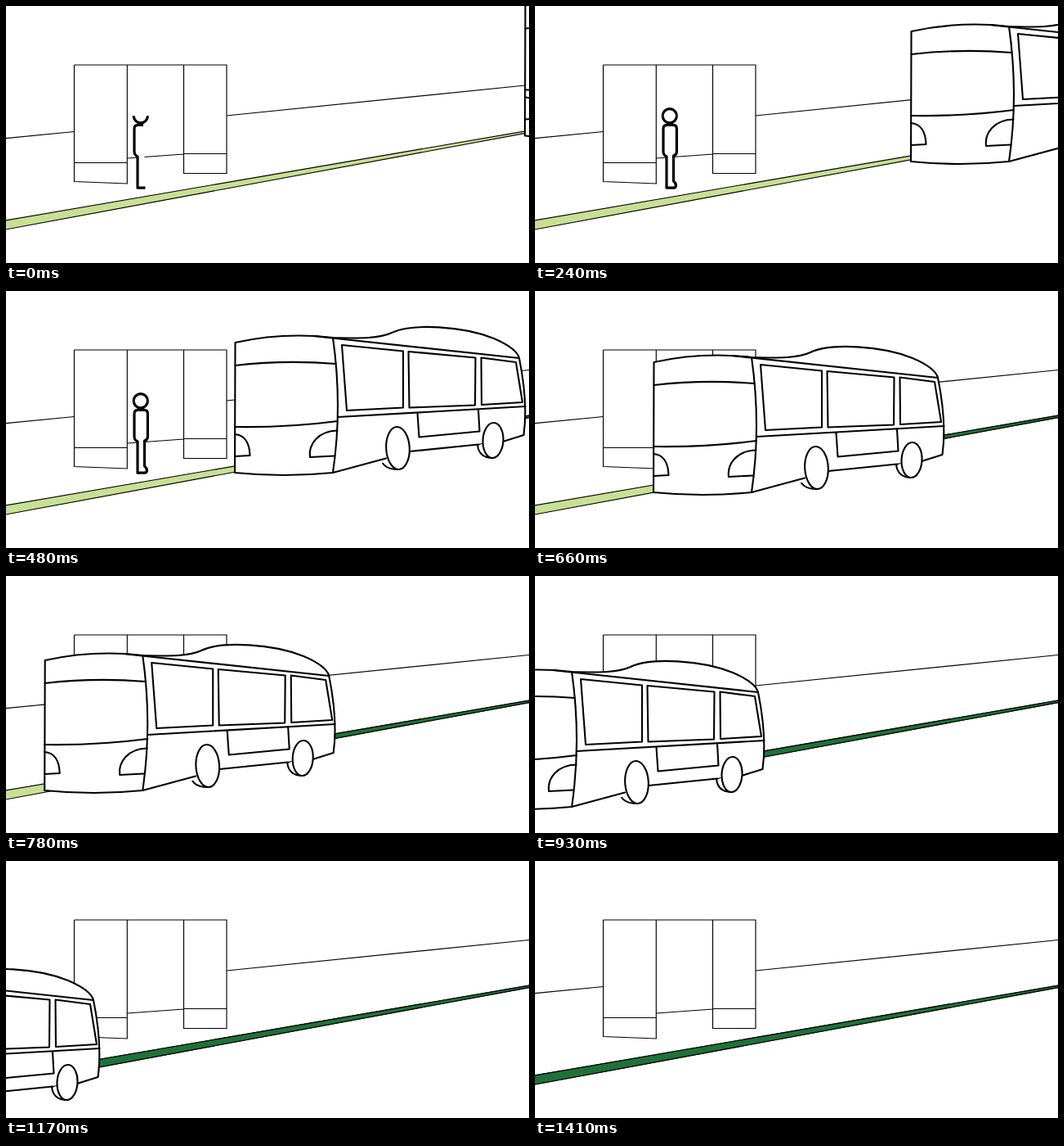
Write an HTML page that moves like this. It is 640 px wide and 314 px high and loops after 1.44 s.

```html
<!DOCTYPE html>
<html lang="en">
<head>
<meta charset="utf-8">
<title>Bus stop</title>
<style>
  html, body { margin: 0; width: 100%; height: 100%; overflow: hidden; background: #fff; }
  svg { display: block; width: 640px; height: 314px; }
  path, ellipse, circle { stroke: #000; fill: none; }
  .thin { stroke-width: 1.15; }
  #bus { stroke-width: 2.1; stroke-linejoin: round; stroke-linecap: round; }
  #bus .solid { fill: #fff; }
  #bus .body { stroke: none; }
  #person { stroke-width: 3.2; stroke-linejoin: round; }
  #person .mask { fill: #fff; stroke: none; }
</style>
</head>
<body>
<svg viewBox="0 0 640 314">
  <defs>
    <clipPath id="passed"><rect id="edge" y="0" width="1400" height="314"/></clipPath>
    <path id="kerb" class="thin" d="M-2 262.3L642 151.7V154.2L-2 273.4Z"/>
  </defs>

  <g class="thin">
    <path d="M0 161.7L83.5 153.5M270 134L640 96.5"/>
    <path d="M83.5 72H270V204.5H217.5V72M83.5 72V214.5L148.3 217V72M83.5 191.5H148.3M217.5 180.5H270M148.3 186L217.5 181"/>
  </g>
  <use href="#kerb" style="fill:#c8e094"/>
  <g clip-path="url(#passed)"><use href="#kerb" style="fill:#1f7139"/></g>
  <style>#kerb { fill: inherit; }</style>

  <g id="person">
    <path class="mask" d="M157 150Q157 145 161 145H169Q173.5 145 173.5 150V178Q173 183 169.5 183V222H161V184Q157 183 157 178Z"/>
    <path d="M168 145.3H161.5Q157 145.3 157 150V178Q157 182 161 184V222.2H170.5"/>
    <path d="M173.4 134.2A8.6 8.6 0 0 1 156.2 134.2"/>
    <g id="rest">
      <path d="M156.2 134.2A8.6 8.6 0 0 1 173.4 134.2"/>
      <path d="M166 145.3H169Q173.4 145.3 173.4 150V178Q173.4 182 169.5 183V214Q173 216.5 172.4 220Q172 222.2 169.5 222.2"/>
    </g>
  </g>

  <g id="bus">
    <path class="solid" d="M324 228C325 237 331 242 345 242L340 215ZM442 212C443 222 449 228 461 228L458 205Z"/>
    <path class="solid body" d="M145.5 87Q205 74 265 81C300 82 322 82 337 75C362 63 425 67 462 82Q490 94 493 106Q504 160 498.500 200L265 246Q205 252 145 246Z"/>
    <!-- outline -->
    <path d="M145.500 87Q205 74 265 81C300 82 322 82 337 75C362 63 425 67 462 82Q490 94 493 106Q504 160 498.500 200L473 208M443 211.500L359 220M330 228.500L265 246Q205 252 145 246L145.500 87"/>
    <!-- front -->
    <path d="M265 81Q277 165 265 246M145.500 115Q205 108 269 113M145 190Q210 191 271 183"/>
    <path d="M145 199C158 200 163 211 163.500 225L145 226M270.500 194.500C247 195 235 211 237 227L267 225.500"/>
    <!-- side -->
    <path d="M241 79L493 106M271 178L500.500 165M368.500 173L370.500 202.500L444.500 195.500L443 169"/>
    <path d="M276 90L351 97.500V166.500L282 170ZM357.500 98L439.500 105.500L439 163.500L358.500 166.500ZM446.500 105.500L489 111L497 160L447 163Z"/>
    <ellipse class="solid" cx="344.500" cy="216" rx="14.300" ry="26" transform="rotate(-3 344.500 216)"/>
    <ellipse class="solid" cx="461" cy="206.500" rx="12.500" ry="21.500" transform="rotate(3 461 206.500)"/>
  </g>
</svg>
<script>
  const LOOP = 1440, STEP = 30;
  // time, dx, dy of the bus
  const route = [
    [0, 490, -87.5], [240, 315, -56], [480, 135, -24], [660, 0, 0],
    [930, -220, 36], [1170, -386, 64], [1440, -575, 96]
  ];
  const get = id => document.getElementById(id);
  const bus = get('bus'), edge = get('edge'), person = get('person'), rest = get('rest');
  const show = (el, on) => el.setAttribute('visibility', on ? 'inherit' : 'hidden');

  function busAt(t) {
    const i = route.findIndex(k => k[0] > t);
    const a = route[i - 1], b = route[i];
    const p = (t - a[0]) / (b[0] - a[0]);
    return [a[1] + (b[1] - a[1]) * p, a[2] + (b[2] - a[2]) * p];
  }

  function draw(now) {
    const t = Math.floor((now % LOOP) / STEP) * STEP;
    const [x, y] = busAt(t);
    bus.setAttribute('transform', `translate(${x} ${y})`);
    edge.setAttribute('x', x + 345);
    show(person, t < 720);
    show(rest, t >= STEP);
  }

  const start = performance.now();
  function tick() {
    draw(performance.now() - start);
    requestAnimationFrame(tick);
  }
  tick();
</script>
</body>
</html>
```
